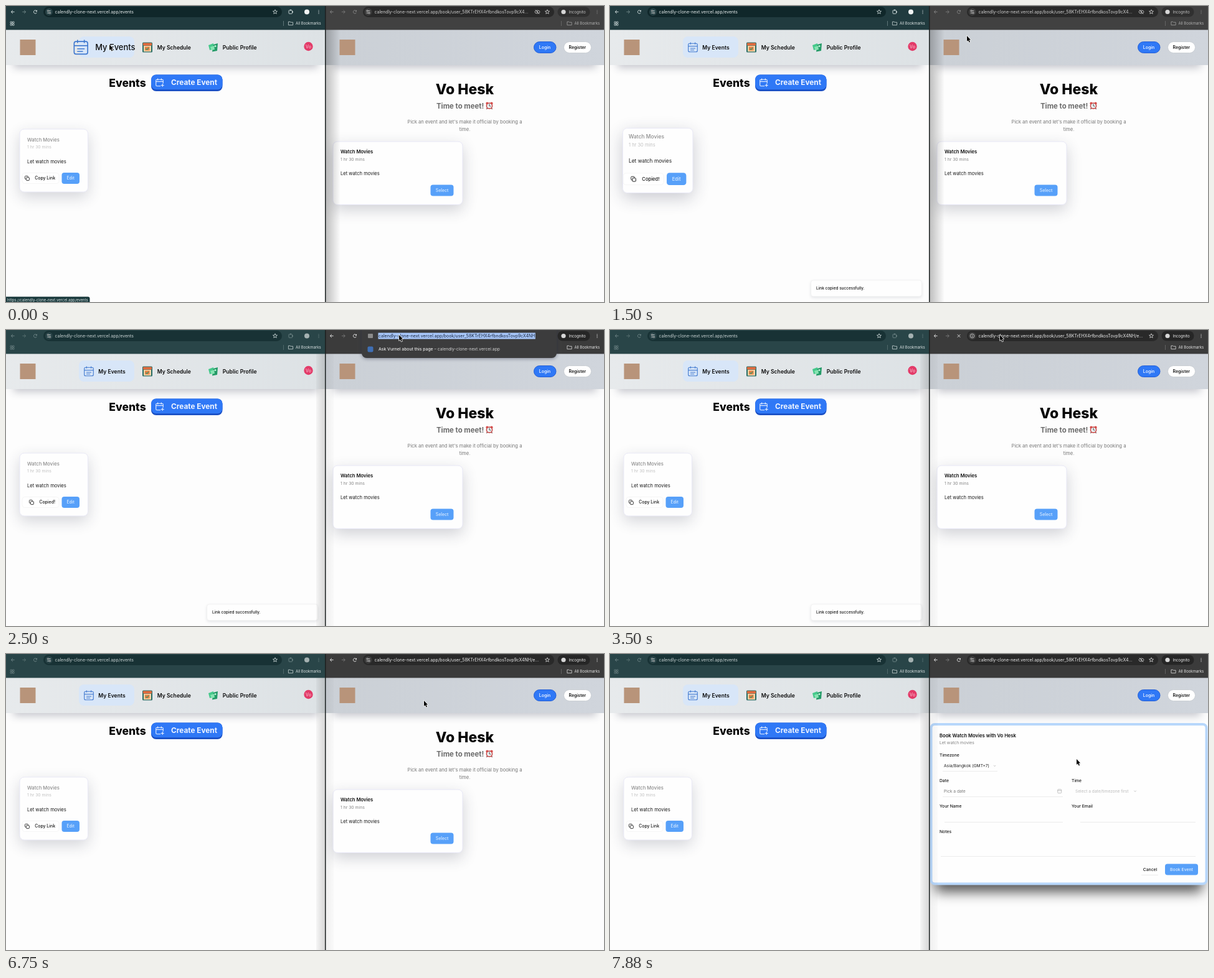
Recreate the animation shown at these times as an HTML page with a canvas. Size 960 px wide and 476 px high, loop 8 s.

```html
<!DOCTYPE html>
<html lang="en">
<head>
<meta charset="utf-8">
<title>Booking demo</title>
<style>
html, body { margin: 0; width: 100%; height: 100%; overflow: hidden; background: #fdfdfd; }
canvas { display: block; width: 960px; height: 476px; }
</style>
</head>
<body>
<canvas id="stage" width="960" height="476"></canvas>
<script>
const ctx = document.getElementById('stage').getContext('2d');
const LOOP = 8000;
const BAR = 38.4;
const HOST = 'Vo Hesk';
const SITE = 'calendly-clone-next.vercel.app';
const USER = 'user_58KTrEHX4rfbndkosTovp9cX4NH';
const BLUE = '#2f78f6', SKY = '#57a0f9';

// Pointer path: time, x, y
const PATH = [
  [0, 166, 62], [130, 163, 68], [620, 60, 274], [1000, 58, 276], [1500, 573, 48],
  [1880, 631, 8], [2600, 631, 8], [3100, 626, 8], [3630, 626, 8], [3900, 642, 52],
  [4500, 671, 75], [7350, 671, 75], [7800, 749, 169], [8000, 749, 169]
];

const clamp = v => Math.max(0, Math.min(1, v));
const ease = v => { v = clamp(v); return v * v * (3 - 2 * v); };
const ramp = (t, a, b) => ease((t - a) / (b - a));
const mix = (a, b, k) => a + (b - a) * k;

function pointerAt(t) {
  let i = 1;
  while (i < PATH.length - 1 && t > PATH[i][0]) i++;
  const [t0, x0, y0] = PATH[i - 1], [t1, x1, y1] = PATH[i];
  const k = ramp(t, t0, t1);
  return [mix(x0, x1, k), mix(y0, y1, k)];
}

function text(str, x, y, size, color, weight = 400, align = 'left') {
  ctx.font = `${weight} ${size}px Inter, "Open Sans", sans-serif`;
  ctx.textAlign = align;
  ctx.fillStyle = color;
  ctx.fillText(str, x, y + size * 0.36);
}

function rect(x, y, w, h, color) {
  ctx.fillStyle = color;
  ctx.fillRect(x, y, w, h);
}

function box(x, y, w, h, r, fill, stroke, width = 1) {
  ctx.beginPath();
  ctx.roundRect(x, y, w, h, r);
  if (fill) { ctx.fillStyle = fill; ctx.fill(); }
  if (stroke) { ctx.strokeStyle = stroke; ctx.lineWidth = width; ctx.stroke(); }
}

function circle(x, y, r, fill, stroke, width = 1) {
  ctx.beginPath();
  ctx.arc(x, y, r, 0, Math.PI * 2);
  if (fill) { ctx.fillStyle = fill; ctx.fill(); }
  if (stroke) { ctx.strokeStyle = stroke; ctx.lineWidth = width; ctx.stroke(); }
}

function line(color, width, ...p) {
  ctx.beginPath();
  ctx.moveTo(p[0], p[1]);
  for (let i = 2; i < p.length; i += 2) ctx.lineTo(p[i], p[i + 1]);
  ctx.strokeStyle = color;
  ctx.lineWidth = width;
  ctx.stroke();
}

function poly(fill, ...p) {
  ctx.beginPath();
  for (let i = 0; i < p.length; i += 2) ctx.lineTo(p[i], p[i + 1]);
  ctx.closePath();
  ctx.fillStyle = fill;
  ctx.fill();
}

function shade(x, y, w, h, from, to) {
  const g = ctx.createLinearGradient(x, y, x + w, y);
  g.addColorStop(0, `rgba(0,0,0,${from})`);
  g.addColorStop(1, `rgba(0,0,0,${to})`);
  rect(x, y, w, h, g);
}

function shadow(blur, dy, alpha, draw, rgb = '40,44,70') {
  ctx.save();
  ctx.shadowBlur = blur;
  ctx.shadowOffsetY = dy;
  ctx.shadowColor = `rgba(${rgb},${alpha})`;
  draw();
  ctx.restore();
}

function scaled(cx, cy, k, draw) {
  ctx.save();
  ctx.translate(cx, cy);
  ctx.scale(k, k);
  ctx.translate(-cx, -cy);
  draw();
  ctx.restore();
}

function pane(x, w, draw) {
  ctx.save();
  ctx.beginPath();
  ctx.rect(x, 0, w, 476);
  ctx.clip();
  draw();
  ctx.restore();
}

/* Browser icons */
function arrow(x, y, dir, c) {
  line(c, 0.9, x - 2.6 * dir, y, x + 2.8 * dir, y);
  line(c, 0.9, x, y - 2.7, x + 2.8 * dir, y, x, y + 2.7);
}
function reload(x, y, c) {
  ctx.beginPath();
  ctx.arc(x, y, 2.6, 0.4, 5.5);
  ctx.strokeStyle = c; ctx.lineWidth = 0.9; ctx.stroke();
  poly(c, x + 3, y - 3.2, x + 3, y - 0.4, x + 0.4, y - 0.6);
}
function stop(x, y, c) {
  line(c, 0.9, x - 2.3, y - 2.3, x + 2.3, y + 2.3);
  line(c, 0.9, x - 2.3, y + 2.3, x + 2.3, y - 2.3);
}
function tune(x, y, c) {
  for (const d of [-1, 1]) {
    line(c, 0.9, x - 2.8, y + 1.7 * d, x + 2.8, y + 1.7 * d);
    circle(x + 1.5 * d, y + 1.7 * d, 1.1, '#222', c, 0.8);
  }
}
function info(x, y, c) {
  circle(x, y, 3.2, null, c, 0.8);
  rect(x - 0.4, y - 0.5, 0.8, 2.2, c);
  rect(x - 0.4, y - 1.8, 0.8, 0.8, c);
}
function star(x, y, c) {
  ctx.beginPath();
  for (let i = 0; i < 10; i++) {
    const a = i * Math.PI / 5 - Math.PI / 2, r = i % 2 ? 1.6 : 3.7;
    ctx.lineTo(x + r * Math.cos(a), y + r * Math.sin(a));
  }
  ctx.closePath();
  ctx.strokeStyle = c; ctx.lineWidth = 0.8; ctx.stroke();
}
function eye(x, y, c) {
  ctx.beginPath();
  ctx.ellipse(x, y, 4, 2.5, 0, 0, 7);
  ctx.strokeStyle = c; ctx.lineWidth = 0.8; ctx.stroke();
  circle(x, y, 1.1, c);
  line(c, 0.8, x - 3.3, y - 3.2, x + 3.3, y + 3.2);
}
function dots(x, y, c) {
  for (const d of [-2.4, 0, 2.4]) circle(x, y + d, 0.7, c);
}
function folder(x, y, c) {
  line(c, 0.8, x - 3.6, y + 2.7, x - 3.6, y - 2.7, x - 1, y - 2.7, x, y - 1.8,
    x + 3.6, y - 1.8, x + 3.6, y + 2.7, x - 3.6, y + 2.7);
}

function toolbarLeft(active) {
  rect(0, 0, 513, BAR, active ? '#213b3f' : '#294548');
  const c = active ? '#d3dfdf' : '#6f8586', dim = active ? '#718788' : '#5a7172';
  arrow(11, 9.5, -1, c);
  arrow(29, 9.5, 1, dim);
  reload(47, 9.5, c);
  box(60, 1, 383, 17, 8.5, active ? '#10272a' : '#183235');
  circle(69, 9.5, 6, '#294347');
  tune(69, 9.5, '#d3dfdf');
  text(SITE + '/events', 78.5, 9.5, 6.95, active ? '#e8eeee' : '#cbd5d5');
  star(432, 9.5, '#d3dfdf');
  box(454, 6.8, 5.6, 5.6, 1, null, c, 0.9);
  circle(457, 6.6, 1.1, c);
  circle(460, 9.6, 1.1, c);
  circle(483, 9.5, 4, active ? '#f2f4f4' : '#a5b2b2');
  dots(502, 9.5, c);
  for (const x of [7, 10.5]) for (const y of [25.2, 28.7]) box(x, y, 2.5, 2.5, 0.3, null, c, 0.8);
  rect(445, 24, 0.8, 8, dim);
  folder(457, 28, '#cad5d5');
  text('All Bookmarks', 465, 28, 6, '#dbe3e3');
}

function toolbarRight(t, active) {
  rect(513, 0, 447, BAR, active ? '#3b3b3b' : '#414141');
  const c = active ? '#e4e4e4' : '#858585';
  const editing = t >= 2000 && t < 3000;
  const loading = t >= 3000 && t < 7050;
  arrow(523, 9.5, -1, c);
  arrow(541.5, 9.5, 1, '#787878');
  (t >= 3000 && t < 6750 ? stop : reload)(560, 9.5, c);

  if (editing) {
    shadow(6, 1, 0.5, () => box(571, -8, 313, 53, 8, '#3c3c3d'));
  } else {
    box(573, 1, 307, 17, 8.5, '#292929');
    circle(581.5, 9.5, 6, '#3e3e3e');
    (t >= 3000 && t < 6380 ? info : tune)(581.5, 9.5, '#d9d9d9');
  }

  const full = `${SITE}/book/${USER}`;
  if (editing) {
    box(581, 6, 8, 7, 1, '#8b8b8b');
    const pasted = t >= 2780;
    const url = pasted ? full + '/e...' : full;
    ctx.font = '400 6.95px Inter, "Open Sans", sans-serif';
    if (!pasted) rect(597.5, 4.5, ctx.measureText(url).width + 1, 10, '#a8c7fa');
    text(url, 598, 9.5, 6.95, pasted ? '#f0f0f0' : '#17243c');
    box(580.5, 26.5, 9, 9, 2, '#3f6fb5');
    const ask = 'Ask Vurnel about this page';
    text(ask, 598, 30.7, 6.8, '#e8e8e8', 500);
    text(' – ' + SITE, 598 + ctx.measureText(ask).width, 30.7, 6.8, '#d0d0d0');
  } else {
    const url = loading ? full + '/e...' : full.slice(0, -2) + '...';
    text(url, 591.5, 9.5, 6.95, active ? '#ececec' : '#d0d0d0');
    if (!loading) eye(853, 9.5, '#d5d5d5');
    star(869, 9.5, '#d9d9d9');
  }

  box(885.5, 1.5, 52, 16, 8, active ? '#262626' : '#303030');
  circle(895, 9.5, 3.6, '#d7d7d7');
  text('Incognito', 903.5, 9.5, 6.2, active ? '#f0f0f0' : '#c2c2c2');
  dots(949, 9.5, c);
  if (!editing) rect(891, 24, 0.8, 8, '#6d6d6d');
  folder(904.5, 28, active ? '#dcdcdc' : '#a0a0a0');
  text('All Bookmarks', 912.5, 28, 6, active ? '#e5e5e5' : '#b0b0b0');
}

/* Page parts */
function header(x, w, from, to) {
  shadow(14, 5, 0.28, () => rect(x + 12, 60, w - 24, 34, '#ccc'));
  const g = ctx.createLinearGradient(x, 0, x + w, 0);
  g.addColorStop(0, from);
  g.addColorStop(1, to);
  rect(x, 38, w, 57, g);
}

const logo = x => rect(x - 12.5, 54, 25, 25, '#b8947a');

function calendar(x, y, s, c, plus) {
  const w = s * 0.5;
  box(x - w, y - w + 1, s, s - 1, s * 0.14, null, c, 1.1);
  line(c, 1.1, x - w, y - w * 0.25, x + w, y - w * 0.25);
  for (const d of [-0.5, 0.5]) line(c, 1.1, x + w * d, y - w - 0.8, x + w * d, y - w + 2.6);
  if (plus) {
    rect(x + 1.6, y + 1.6, 6, 6, BLUE);
    line(c, 1.1, x + 2.2, y + 4.6, x + 7.2, y + 4.6);
    line(c, 1.1, x + 4.7, y + 2.1, x + 4.7, y + 7.1);
  } else {
    line(c, 1, x - w * 0.55, y + w * 0.22, x + w * 0.55, y + w * 0.22);
    line(c, 1, x - w * 0.55, y + w * 0.6, x + w * 0.3, y + w * 0.6);
  }
}

function nav(t) {
  box(117, 49, 89, 34, 8, '#d8e6f8');
  const k = mix(1.5, 1, ramp(t, 150, 420));
  scaled(158.5, 66.5, k, () => {
    calendar(133, 66.5, 14.5, '#3f78cf');
    text('My Events', 148.3, 66.5, 8.6, '#0c0c0c', k > 1.2 ? 500 : 600);
  });

  box(219, 58.5, 16, 16, 1.5, '#286d66');
  rect(220, 59.5, 14, 4, '#e66c3e');
  rect(221, 64, 12, 9.3, '#f6d5a8');
  rect(223, 65.5, 7.5, 6, '#e78145');
  line('#34966b', 1.1, 224.5, 68.5, 226.3, 70.2, 229.2, 66.8);
  text('My Schedule', 242.8, 66.5, 8.6, '#0c0c0c', 600);

  poly('#46c98b', 325, 63, 333, 60, 334, 69, 327, 71);
  poly('#239a67', 333, 62, 340, 60, 339, 72, 331, 73.5);
  poly('#87e4b2', 328, 66, 334, 64, 335, 70, 330, 71);
  circle(336, 64.5, 1.5, '#bdf1d5');
  text('Public Profile', 347.8, 66.5, 8.6, '#0c0c0c', 600);

  circle(485.5, 65, 7.2, '#e33b69');
  text(HOST.slice(0, 2), 485.5, 65, 7.2, '#f9cfdb', 400, 'center');
}

function eventCard(t) {
  const k = ramp(t, 520, 720) * (1 - ramp(t, 1950, 2150));
  const g = k * 1.5;
  shadow(mix(24, 28, k), 8, mix(0.2, 0.25, k),
    () => box(22 - g, 198 - g, 109.5 + 2 * g, 101 + 2 * g, 7, '#fff'));
  box(22 - g, 198 - g, 109.5 + 2 * g, 101 + 2 * g, 7, '#fefefe', '#e9e9f6', 1);
  scaled(74, 265, mix(1, 1.1, k), () => {
    text('Watch Movies', 34, 215, 7.7, '#8c8c8c', 500);
    text('1 hr 30 mins', 34, 227, 6.8, '#c0c0c0');
    text('Let watch movies', 34, 250, 7.6, '#1a1a1a');
    box(26, 268.5, 59, 17, 4, '#fff', '#f3f3f3', 0.7);
    const copied = t >= 950 && t < 2950;
    const x = copied ? 41 : 34;
    box(x - 3.6, 273.4, 5, 5, 1, null, '#333', 0.9);
    box(x - 1.6, 275.6, 5, 5, 1, '#fff', '#222', 0.9);
    text(copied ? 'Copied!' : 'Copy Link', 79, 277, 6.9, '#161616', 500, 'right');
    box(89.5, 268, 28.5, 18, 4, SKY);
    text('Edit', 103.7, 277, 6.9, '#dcecff', 500, 'center');
  });
}

function toast(t) {
  const k = ramp(t, 1000, 1300) * (1 - ramp(t, 4130, 4600));
  if (k <= 0) return;
  const dy = (1 - k) * 38;
  shadow(5, 2, 0.13, () => box(322.5, 441 + dy, 178, 26, 4, '#fff'));
  box(322.5, 441 + dy, 178, 26, 4, '#fefefe', '#efefef', 0.8);
  text('Link copied successfully.', 331, 453.3 + dy, 6.45, '#171717', 500);
}

function leftPage(t, active) {
  rect(0, 38, 513, 438, '#fdfdfd');
  header(0, 513, '#e7eaec', '#dde2e5');
  logo(35);
  nav(t);
  text('Events', 165.3, 123.3, 17.5, '#050505', 800);
  box(233, 110.5, 114.5, 26.5, 8, '#1a4fc4');
  box(233, 110.5, 114.5, 23.8, 8, BLUE);
  calendar(246.5, 123, 11.5, '#e9f1ff', true);
  text('Create Event', 265, 123, 11.8, '#eef4ff', 700);
  eventCard(t);
  toast(t);
  if (!active) shade(498, 38, 15, 438, 0.03, 0.16);
  toolbarLeft(active);
  if (t < 300) {
    box(-4, 467.5, 138.5, 14, 3, '#18383b');
    text('https://' + SITE + '/events', 2, 472.8, 6, '#dfe8e8');
  }
}

function clock(x, y) {
  line('#7a3435', 1.4, x - 3, y + 3, x - 4.5, y + 5.5);
  line('#7a3435', 1.4, x + 3, y + 3, x + 4.5, y + 5.5);
  circle(x - 3.6, y - 4, 2, '#d64b48');
  circle(x + 3.6, y - 4, 2, '#d64b48');
  circle(x, y, 4.6, '#e9f0f2', '#c94644', 1.5);
  line('#333', 0.9, x, y - 3, x, y, x + 2.2, y + 1);
}

function profile() {
  text(HOST, 736.5, 133.3, 23, '#050505', 800, 'center');
  text('Time to meet!', 691, 161, 11.4, '#6b6b6b', 700);
  clock(776, 160.5);
  text("Pick an event and let's make it official by booking a", 736.5, 186.5, 7.63, '#777', 400, 'center');
  text('time.', 736.5, 198.5, 7.63, '#777', 400, 'center');
  shadow(24, 8, 0.22, () => box(525, 218, 208, 101.5, 7, '#fff'));
  box(525, 218, 208, 101.5, 7, '#fefefe', '#e8e8f6', 1);
  text('Watch Movies', 537, 234.7, 7.65, '#101010', 600);
  text('1 hr 30 mins', 537, 246.5, 6.8, '#858585');
  text('Let watch movies', 537, 269.7, 7.6, '#1a1a1a');
  box(681.5, 287.5, 37, 18, 4, SKY);
  text('Select', 700, 296.5, 6.9, '#dcecff', 500, 'center');
}

function chevron(x, y) {
  line('#aaa', 0.7, x - 1.7, y - 0.8, x, y + 0.9, x + 1.7, y - 0.8);
}

function form(t) {
  const k = ramp(t, 7000, 7400);
  ctx.save();
  ctx.globalAlpha = clamp((t - 6980) / 200);
  scaled(736.5, 241, mix(0.985, 1, k), () => {
    shadow(20, 12, 0.65, () => box(522, 125, 429, 246, 6, '#fff'), '0,0,0');
    box(515.5, 113, 442, 256.5, 6, '#fefefe', '#b7d7fb', 4);
    text(`Book Watch Movies with ${HOST}`, 529, 130.8, 7.65, '#101010', 600);
    text('Let watch movies', 529, 142.5, 6.75, '#808080');
    const label = (s, x, y) => text(s, x, y, 6.75, '#171717', 500);
    label('Timezone', 529, 163);
    text('Asia/Bangkok (GMT+7)', 536, 179.7, 6.7, '#222');
    chevron(617.5, 179.8);
    label('Date', 529, 204);
    label('Time', 741, 204);
    text('Pick a date', 536, 220.5, 6.7, '#777');
    text('Select a date/timezone first', 747, 220.5, 6.6, '#bcbcbc');
    chevron(843, 220.5);
    box(718.7, 217.7, 6, 6, 1, null, '#aaa', 0.7);
    line('#aaa', 0.7, 718.7, 219.7, 724.7, 219.7);
    label('Your Name', 529, 245);
    label('Your Email', 741, 245);
    label('Notes', 529, 286);
    const rule = (x0, x1, y) => line('#e6e6e6', 0.7, x0, y, x1, y);
    rule(534, 622, 188.5);
    rule(534, 727, 229.5);
    rule(537, 727, 270.5);
    rule(755, 940, 270.5);
    rule(531, 940, 325.5);
    rule(853, 880, 355.5);
    text('Cancel', 867, 346.5, 6.85, '#1a1a1a', 500, 'center');
    box(891, 337.5, 53, 18, 4, SKY);
    text('Book Event', 917.5, 346.5, 6.85, '#e0eeff', 500, 'center');
  });
  ctx.restore();
}

function rightPage(t, active) {
  const booked = t >= 7000;
  const fade = booked ? 1 - ramp(t, 7000, 7550) : 0;
  rect(513, 38, 447, 438, '#fdfdfd');
  header(513, 447, '#cbd0d6', '#d0d5dc');
  rect(513, 38, 447, 57, `rgba(253,253,253,${0.6 * fade})`);
  ctx.save();
  ctx.globalAlpha = 1 - 0.3 * fade;
  logo(548);
  box(847.5, 57.5, 35.5, 18, 9, BLUE, '#245fd6', 1);
  text('Login', 865, 66.5, 6.9, '#e9f1ff', 600, 'center');
  box(895.5, 57.5, 44, 18, 9, '#fff', '#c5c9ce', 0.8);
  text('Register', 917.3, 66.5, 6.9, '#1a1a1a', 600, 'center');
  ctx.restore();
  if (booked) form(t); else profile();
  if (active) shade(513, 38, 13, 438, 0.05, 0.015);
  else shade(513, 38, 24, 438, 0.25, 0);
  toolbarRight(t, active);
}

function pointer(t) {
  const [x, y] = pointerAt(t);
  ctx.save();
  ctx.translate(x, y);
  ctx.beginPath();
  const p = [0, 0, 0, 9, 2, 7.2, 3.6, 10.6, 5.1, 9.9, 3.5, 6.6, 6.2, 6.4];
  for (let i = 0; i < p.length; i += 2) ctx.lineTo(p[i], p[i + 1]);
  ctx.closePath();
  ctx.lineJoin = 'round';
  ctx.lineWidth = 1.4;
  ctx.strokeStyle = '#fff';
  ctx.stroke();
  ctx.fillStyle = '#050505';
  ctx.fill();
  ctx.restore();
}

function draw(t) {
  const rightActive = t >= 1900;
  pane(0, 513, () => leftPage(t, !rightActive));
  pane(513, 447, () => rightPage(t, rightActive));
  rect(512, 0, 1.5, 476, '#1b2020');
  pointer(t);
}

const start = performance.now();
function tick() {
  draw((performance.now() - start) % LOOP);
  requestAnimationFrame(tick);
}
tick();
</script>
</body>
</html>
```
